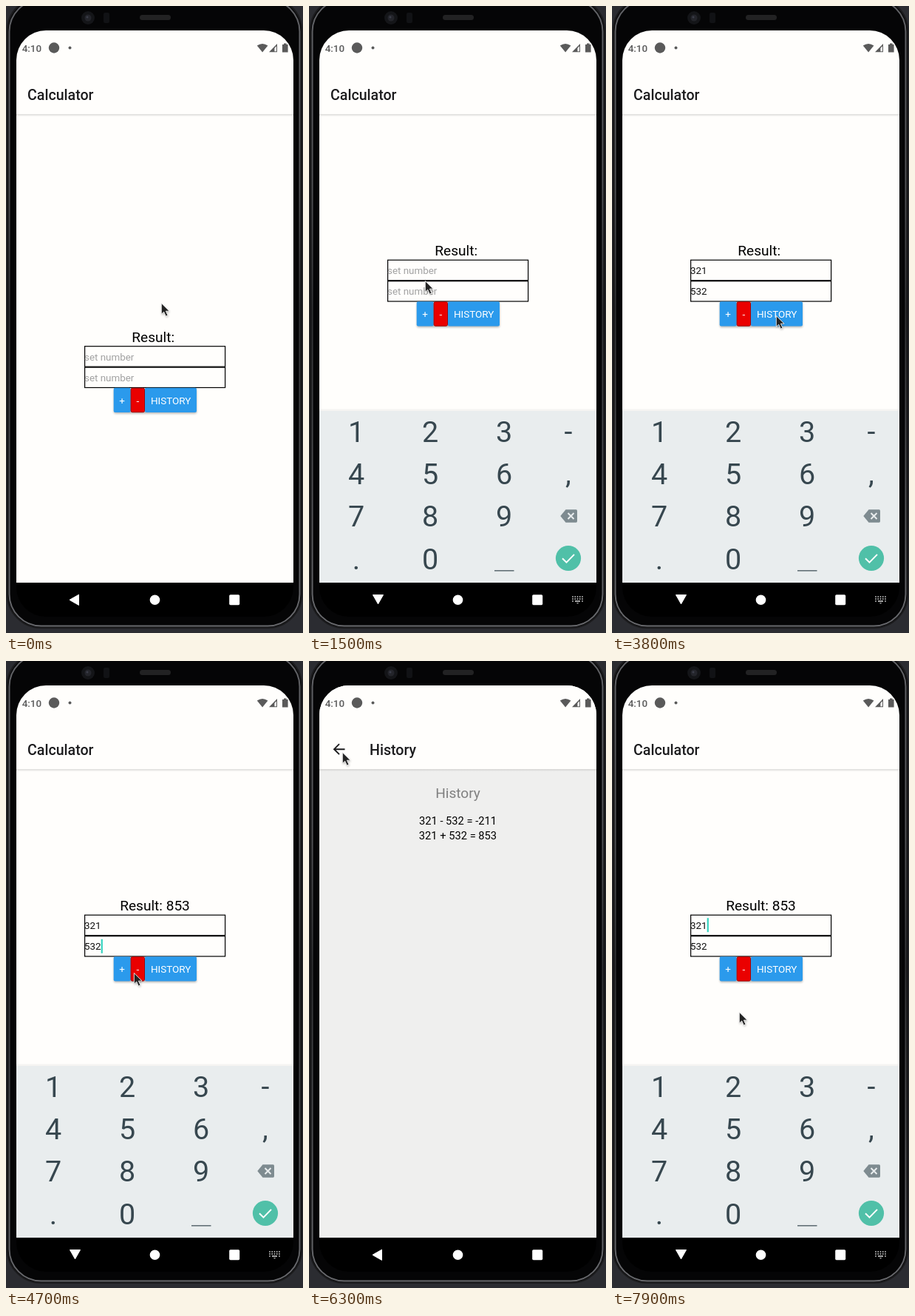
An HTML page for the animation above (8000 ms loop, 402 by 847 pixels).

```html
<!DOCTYPE html>
<html lang="en">
<head>
<meta charset="utf-8">
<title>Calculator demo</title>
<style>
  html, body { margin: 0; width: 100%; height: 100%; overflow: hidden; background: #2b2c31; }
  svg { display: block; width: 100%; height: 100%; font-family: Roboto, sans-serif; }
  .mid { text-anchor: middle; }
  .title { font-size: 19.6px; font-weight: 500; fill: #1c1c1e; }
  .big { font-size: 19.1px; }
  .entry { font-size: 13.4px; }
  .item { font-size: 14.7px; }
  .button { font-size: 13.5px; fill: #fff; }
  .key { font-size: 39.5px; fill: #37474f; }
</style>
</head>
<body>
<svg viewBox="0 0 402 847" preserveAspectRatio="none">
  <defs>
    <clipPath id="glass"><rect x="14" y="33" width="375" height="792" rx="40"/></clipPath>
    <filter id="soft" x="-20%" y="-30%" width="140%" height="180%"><feGaussianBlur stdDeviation="1.7"/></filter>
    <linearGradient id="rim" x1="0" y1="0" x2="0" y2="1">
      <stop offset="0" stop-color="#626367"/>
      <stop offset=".3" stop-color="#505154"/>
      <stop offset=".5" stop-color="#2f3032"/>
      <stop offset="1" stop-color="#68696d"/>
    </linearGradient>
    <linearGradient id="fade" x1="0" y1="0" x2="0" y2="1">
      <stop offset="0" stop-color="#000" stop-opacity=".14"/>
      <stop offset="1" stop-color="#000" stop-opacity="0"/>
    </linearGradient>
  </defs>

  <!-- phone body -->
  <rect width="402" height="847" fill="#2b2c31"/>
  <rect x="1.5" y="-12" width="399" height="852" rx="46" fill="#0a0a0b" stroke="#1b1b1d" stroke-width="2"/>
  <rect x="4.5" y="-8.5" width="393" height="846" rx="43" fill="#050506" stroke="url(#rim)" stroke-width="2"/>
  <circle cx="111" cy="16" r="9" fill="#141518"/>
  <circle cx="111" cy="16" r="4.5" fill="#24252b"/>
  <circle cx="110" cy="15" r="1.5" fill="#3b3d48"/>
  <rect x="132" y="9" width="8" height="14" rx="2" fill="#111215"/>
  <rect x="181" y="12" width="42" height="7" rx="3.5" fill="#222223"/>

  <g clip-path="url(#glass)">
    <rect x="14" y="33" width="375" height="746" fill="#fffefc"/>

    <g id="calc">
      <text class="title" x="29" y="127">Calculator</text>
      <rect x="14" y="146" width="375" height="3.5" fill="url(#fade)"/>
      <g id="form">
        <text id="result" class="mid big" x="201.5" y="453.5"></text>
        <g fill="none" stroke="#000" stroke-width="1.2">
          <rect x="106.6" y="459.7" width="190" height="27.5"/>
          <rect x="106.6" y="488.2" width="190" height="27.3"/>
        </g>
        <text id="entry0" class="entry" x="106" y="478.5"></text>
        <text id="entry1" class="entry" x="106" y="506.7"></text>
        <rect id="caret" width="2.2" height="19" fill="#35d3c0"/>
        <rect x="146" y="518" width="112" height="32.5" rx="2" fill="#000" opacity=".3" filter="url(#soft)"/>
        <rect x="145.7" y="515.8" width="23" height="33.2" rx="2" fill="#2b9aec"/>
        <rect x="188" y="515.8" width="70" height="33.2" rx="2" fill="#2b9aec"/>
        <rect x="169.1" y="516.2" width="18.4" height="32.5" rx="2" fill="#ea0000" stroke="#a30303" stroke-width="1"/>
        <text class="mid button" x="157" y="537.8">+</text>
        <text class="mid button" x="178.3" y="537.8">-</text>
        <text class="mid button" x="223.2" y="537.8">HISTORY</text>
      </g>
    </g>

    <g id="history">
      <rect x="14" y="33" width="375" height="746" fill="#efefee"/>
      <rect x="14" y="33" width="375" height="113.5" fill="#fffefc"/>
      <rect x="14" y="146" width="375" height="3" fill="url(#fade)"/>
      <path d="M48.5 119.2H35M41 112.2L34 119.2L41 126.2" fill="none" stroke="#1c1c1e" stroke-width="1.9"/>
      <text class="title" x="82" y="127">History</text>
      <text class="mid big" x="201.5" y="185.2" fill="#808080">History</text>
      <text class="mid item" x="201.5" y="220.5">321 - 532 = -211</text>
      <text class="mid item" x="201.5" y="240.7">321 + 532 = 853</text>
    </g>

    <!-- status bar -->
    <g fill="#5a5a5a">
      <text x="21.7" y="61.7" font-size="13.4" font-weight="500">4:10</text>
      <circle cx="65" cy="56.5" r="7.2"/>
      <circle cx="86.5" cy="56.5" r="2"/>
      <path d="M339.8 53.6Q347 48.6 354.4 53.6L347.1 62.6Z"/>
      <path d="M356 62.3L367 51V62.3Z"/>
      <path d="M363.4 57L366 54.2V61.2H363.4Z" fill="#fffefc"/>
      <path d="M374 52h2v-1.6h3.6V52h2v10.6h-7.6Z"/>
    </g>

    <rect x="14" y="779" width="375" height="46"/>
    <g id="keyboard">
      <rect x="14" y="544.5" width="375" height="3" fill="#000" opacity=".04"/>
      <rect x="14" y="547" width="375" height="232" fill="#e9edee"/>
      <g id="keys"></g>
      <rect x="251" y="762" width="26.5" height="1.6" fill="#37474f" opacity=".75"/>
      <path d="M347.5 680.3H361.5Q363 680.3 363 682V696Q363 697.7 361.5 697.7H347.5L340.3 689Z" fill="#7e8b90"/>
      <path d="M350.5 685l8 8M358.5 685l-8 8" stroke="#e9edee" stroke-width="2"/>
      <circle cx="351" cy="746" r="17.1" fill="#50c0a8"/>
      <path d="M343 746.2l5.5 5.5l10.5 -10.8" fill="none" stroke="#fff" stroke-width="2"/>
    </g>

    <!-- navigation bar -->
    <g fill="#fff" stroke-linejoin="round">
      <path id="back" stroke="#fff"/>
      <circle cx="201.5" cy="802.3" r="6.8"/>
      <rect x="302.2" y="795.2" width="14" height="14" rx="1.6"/>
      <g id="switcher" stroke="#fff" stroke-width="1.6" stroke-dasharray="1.6 1.65" opacity=".85">
        <path d="M356.2 798h14.6M356.2 801h14.6"/>
        <path d="M356.2 804h1.6M360 804h7M369.2 804h1.6" stroke-dasharray="none"/>
        <path d="M361.8 806.2h3.6l-1.8 1.2z" stroke="none"/>
      </g>
    </g>
  </g>

  <g id="pointer">
    <path d="M.8 2V17l3.5 -3.2l2.6 5.8l2.8 -1.2l-2.6 -5.6h4.8z" opacity=".3" filter="url(#soft)"/>
    <path d="M.3 .5V15.3l3.4 -3.1l2.6 5.9l2.7 -1.2l-2.6 -5.7h4.7z" fill="#232323" stroke="#f4f4f4" stroke-width=".9"/>
  </g>
</svg>

<script>
const LOOP = 8000, STEP = 100, KEYBOARD = 232, LIFT = 116.5;
const $ = id => document.getElementById(id);
const clamp = v => Math.max(0, Math.min(1, v));
const within = (t, a, b) => t >= a && t < b;

// pointer stops: time, x, y
const stops = [
  [0, 210, 401], [100, 201, 440], [200, 201, 440], [300, 200, 442], [400, 200, 442],
  [500, 200, 446], [600, 200, 446], [700, 200, 460], [900, 200, 477], [1200, 200, 477],
  [1500, 157, 371], [1700, 175, 410], [1800, 175, 401], [2000, 175, 401], [2300, 163, 382],
  [2500, 162, 382], [2800, 162, 382], [3300, 244, 419], [3700, 244, 419], [4000, 178, 416],
  [4200, 178, 416], [4400, 157, 415], [4600, 160, 417], [4700, 173, 421], [4800, 173, 421],
  [5000, 218, 417], [5200, 218, 417], [5700, 90, 236], [6200, 45, 123], [6500, 45, 123],
  [6800, 130, 399], [6900, 130, 399], [7100, 168, 461], [7300, 168, 461], [7500, 173, 478],
  [7700, 172, 476], [7800, 172, 476], [7900, 172, 474]
];

function pointerAt(t) {
  const i = stops.findIndex(s => s[0] >= t);
  if (i < 1) return stops[0].slice(1);
  const [t0, x0, y0] = stops[i - 1], [t1, x1, y1] = stops[i];
  const k = (t - t0) / (t1 - t0);
  return [x0 + (x1 - x0) * k, y0 + (y1 - y0) * k];
}

// cubic-bezier(.4, 0, .2, 1)
function ease(x) {
  let lo = 0, hi = 1;
  for (let i = 0; i < 24; i++) {
    const s = (lo + hi) / 2, r = 1 - s;
    if (1.2 * s * r * r + 0.6 * s * s * r + s ** 3 < x) lo = s; else hi = s;
  }
  return lo * lo * (3 - 2 * lo);
}
const ramp = (t, start, length) => ease(clamp((t - start) / length));

function typed(t, text, start) {
  return text.slice(0, Math.max(0, Math.floor((t - start) / STEP) + 1));
}

function setEntry(id, text) {
  $(id).textContent = text || "set number";
  $(id).setAttribute("fill", text ? "#111" : "#a2a2a2");
}

function setCaret(t, first, second) {
  const upper = within(t, 700, 1500) || within(t, 2000, 2300) || t >= 7400;
  const lower = within(t, 2600, 3800) || within(t, 4200, 4500) || within(t, 4700, 5200);
  const chars = (upper ? first : second).length;
  const caret = $("caret");
  caret.setAttribute("x", 106.1 + chars * 7.52);
  caret.setAttribute("y", upper ? 463.7 : 492.3);
  caret.setAttribute("visibility", upper || lower ? "visible" : "hidden");
}

function zoom(id, scale) {
  $(id).setAttribute("transform",
    `translate(201.5 406) scale(${scale}) translate(-201.5 -406)`);
}

function draw(t) {
  const first = typed(t, "321", 2000), second = typed(t, "532", 2800);
  setEntry("entry0", first);
  setEntry("entry1", second);
  setCaret(t, first, second);
  const sum = t < 4100 ? "" : t < 4400 ? "-211" : "853";
  $("result").textContent = "Result:\u00a0" + sum;

  const raised = within(t, 800, 5200) || t >= 7400;
  $("form").setAttribute("transform", `translate(0 ${raised ? -LIFT : 0})`);

  const up = t < 4000 ? ramp(t, 723, 300)
    : t < 7000 ? 1 - ramp(t, 5100, 300) : ramp(t, 7396, 300);
  $("keyboard").setAttribute("transform", `translate(0 ${KEYBOARD * (1 - up)})`);
  $("keyboard").setAttribute("opacity", clamp(up * 1.43 - 0.24));

  const enter = ramp(t, 5100, 450), leave = clamp((t - 6500) / 300);
  $("history").setAttribute("opacity", clamp(enter * 1.4) * (1 - leave));
  zoom("history", 0.85 + 0.15 * enter - 0.04 * leave);
  zoom("calc", t < 6000 ? 1 + 0.1 * enter : 1);

  const down = within(t, 1200, 5300) || t >= 7900;
  $("back").setAttribute("d", down
    ? "M86.5 795.5H100.5L93.5 807.8Z" : "M86 802.3L98.5 795.2V809.4Z");
  $("switcher").setAttribute("visibility",
    within(t, 800, 5300) || t >= 7400 ? "visible" : "hidden");

  $("pointer").setAttribute("transform", `translate(${pointerAt(t)})`);
}

// digits, then raised symbols in the last column
["123-", "456,", "789", ".0"].forEach((row, r) =>
  [...row].forEach((label, c) => {
    const key = document.createElementNS("http://www.w3.org/2000/svg", "text");
    key.setAttribute("class", "mid key");
    key.setAttribute("x", [64, 164, 264, 351][c]);
    key.setAttribute("y", 589 + r * 57.2 - (c === 3 ? 1.5 : 0));
    key.textContent = label;
    $("keys").append(key);
  }));

const begin = performance.now();
function tick() {
  const t = (performance.now() - begin) % LOOP;
  draw(Math.floor(t / STEP) * STEP);
  requestAnimationFrame(tick);
}
tick();
</script>
</body>
</html>
```
